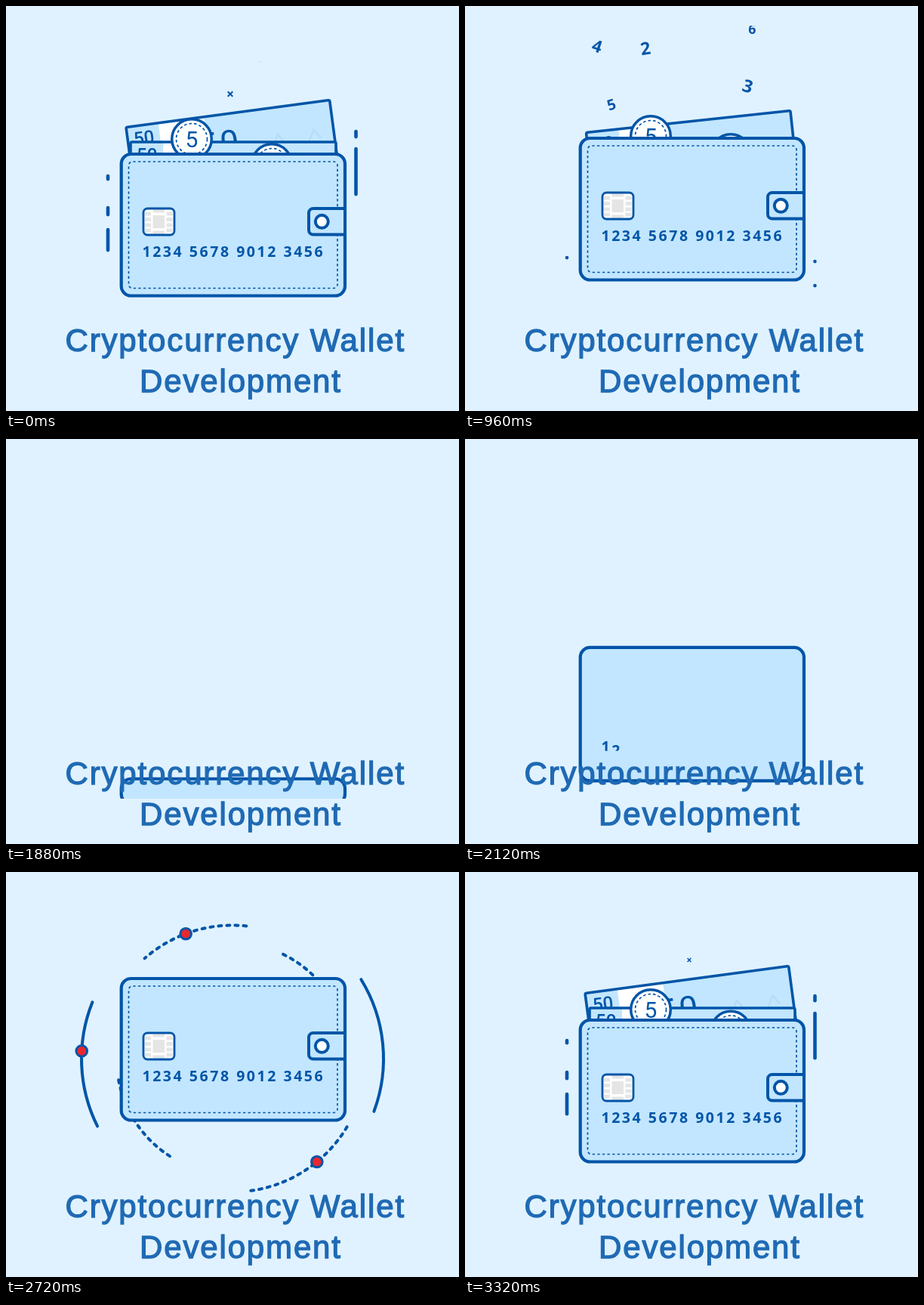
These frames come from a looping animation (600x536 px, 3.36 s). An HTML page with a canvas:

```html
<!DOCTYPE html>
<html lang="en">
<head>
<meta charset="utf-8">
<title>Wallet</title>
<style>
  html, body { margin: 0; width: 600px; height: 536px; overflow: hidden; background: #e0f2ff; }
  canvas, svg { position: absolute; left: 0; top: 0; }
  text { font: 42px "Liberation Sans", Arial, sans-serif; letter-spacing: 1.85px; fill: #1f6ab4; stroke: #1f6ab4; stroke-width: 1.3; }
</style>
</head>
<body>
<canvas id="stage" width="600" height="536"></canvas>
<svg width="600" height="536">
  <text x="78.5" y="457">Cryptocurrency Wallet</text>
  <text x="177" y="511">Development</text>
</svg>
<script>
const c = document.getElementById('stage').getContext('2d');
const LOOP = 3360, INK = '#0055a8', SKY = '#c2e6ff', RAD = Math.PI / 180;
const NUMBER = '1234 5678 9012 3456';

const clamp = u => Math.max(0, Math.min(1, u));
const mix = (a, b, u) => a + (b - a) * u;
const span = (t, a, b) => clamp((t - a) / (b - a));
const smooth = u => u * u * (3 - 2 * u);
const ease = (t, a, b) => smooth(span(t, a, b));
const easeOut = (t, a, b) => Math.sin(Math.PI / 2 * span(t, a, b));

// Eased value through [time, value] keys
function along(t, keys) {
  let v = keys[0][1];
  for (let i = 1; i < keys.length; i++) {
    const [a, from] = keys[i - 1], [b, to] = keys[i];
    if (t >= a) v = mix(from, to, ease(t, a, b));
  }
  return v;
}

function pen(width, dash = [], color = INK, cap = 'butt') {
  c.lineWidth = width;
  c.strokeStyle = color;
  c.lineCap = cap;
  c.setLineDash(dash);
}

function box(x, y, w, h, r, fill, width) {
  c.beginPath();
  c.roundRect(x, y, w, h, r);
  c.fillStyle = fill;
  c.fill();
  if (width) { pen(width); c.stroke(); }
}

function disc(x, y, r, fill, width, dash) {
  if (r <= 0) return;
  c.beginPath();
  c.arc(x, y, r, 0, 7);
  if (fill) { c.fillStyle = fill; c.fill(); }
  pen(width, dash);
  c.stroke();
}

function line(...pts) {
  c.beginPath();
  pts.forEach(([x, y]) => c.lineTo(x, y));
  c.stroke();
}

function label(text, x, y, font, spacing = 0) {
  c.font = font;
  c.letterSpacing = spacing + 'px';
  c.fillStyle = INK;
  c.fillText(text, x, y);
}

// radius, start, tail and head while open, tail and head at the end, dot while open and at the end, dot exit
const orbits = [
  { r: 200, from: -85, open: [-51.7, -7], end: [18.5, 28] },
  { r: 200, from: 100, open: [132, 181.7], end: [207, 207.5], dot: [154.6, 207.5], out: -340 },
  { r: 176.5, from: -40, open: [-63, -96], end: [-136.5, -141], dot: [-75.2, -141.2], out: -340, dash: 1 },
  { r: 176.5, from: 125, open: [107, 62], end: [20, 20], dot: [86, 20], out: -440, dash: 1 },
  { r: 153.5, from: -105, open: [-84.4, -65], end: [-13.5, -3.7], dash: 1 },
  { r: 153.5, from: 80, open: [101, 139.8], end: [177, 178], dash: 1 }
];

function drawOrbits(t) {
  if (t < -1200 || t > -280) return;
  const a = span(t, -1200, -960), b = span(t, -960, -360);
  for (const o of orbits) {
    const turn = (open, end, u) => mix(mix(o.from, open, a), end, u);
    const head = turn(o.open[1], o.end[1], b * (2 - b));
    const tail = mix(turn(o.open[0], o.end[0], b * b), head, span(t, -350, -300));
    if (Math.abs(head - tail) > .2) {
      c.beginPath();
      c.arc(300, 247, o.r, tail * RAD, head * RAD, head < tail);
      pen(4, o.dash ? [4, 7] : [], INK, 'round');
      c.stroke();
    }
    if (o.dot) {
      const d = turn(...o.dot, b) * RAD;
      const size = span(t, -1200, -1080) * (1 - span(t, o.out, o.out + 60));
      disc(300 + o.r * Math.cos(d), 247 + o.r * Math.sin(d), 7.3 * size, '#e9282f', 3 * size);
    }
  }
  if (t > -990 && t < -910) {
    pen(4);
    line([193, 357], [193, 374]);
  }
}

// x, then top and bottom at the start, the middle and the end, then the time it is gone
const streaks = [
  [135, 223, 231, 316, 319, 324, 324, 760],
  [135, 265, 278, 332, 336, 333, 333, 1040],
  [135, 294, 325, 361, 367, 368, 368, 760],
  [463.5, 164, 175, 298, 302, 338, 338, 1040],
  [463.5, 187, 251, 331, 346, 370, 370, 1080]
];

function drawStreaks(t) {
  for (const [x, a0, b0, a1, b1, a2, b2, stop] of streaks) {
    if (t < -230 || t > stop) continue;
    const u = ease(t, 0, 600), v = span(t, 600, Math.min(stop, 960));
    const top = mix(mix(a0, a1, u), a2, v) - 2 * span(-t, 0, 40);
    const end = mix(mix(b0, b1, u), b2, v) - 3 * span(-t, 0, 40);
    const pad = Math.min(2, (end - top) / 2);
    pen(4.6, [], INK, 'round');
    line([x, top + pad], [x, mix(top + pad, end - pad, span(t, -230, -40)) + .1]);
  }
}

// glyph, x, y, height, tilt, start
const sparks = [
  ['×', 297, 116.5, 16, 0, -150], ['7', 337, 74, 16, 8, -20],
  ['5', 194, 130.5, 16, -18, 155], ['6', 380.5, 30.5, 16, 3, 140],
  ['4', 175, 53, 16, 18, 260], ['3', 374.5, 106, 16.5, 17, 470],
  ['2', 239, 56, 16.5, -9, 580]
];

function drawSparks(t) {
  for (const [glyph, x, y, h, tilt, start] of sparks) {
    const s = Math.min(span(t, start, start + 300), 1 - span(t, start + 780, start + 980), 1 - span(t, 1240, 1400));
    if (s <= 0) continue;
    c.save();
    c.translate(x, y);
    c.rotate(tilt * RAD);
    c.scale(s, s);
    if (glyph === '×') {
      pen(4);
      line([-6.5, -6.5], [6.5, 6.5]);
      line([6.5, -6.5], [-6.5, 6.5]);
    } else {
      c.textAlign = 'center';
      label(glyph, 0, h / 2, `bold ${h / .714}px "Open Sans", sans-serif`);
    }
    c.restore();
  }
}

function drawBill(x, y, angle) {
  c.save();
  c.translate(x, y);
  c.rotate(angle * RAD);
  box(0, 0, 272, 110, 2, SKY);
  c.fillStyle = '#fff';
  c.fillRect(43, 0, 61, 110);
  label('50', 8, 25, '500 24px Roboto, sans-serif');
  label('50', 92, 53, '44px Roboto, sans-serif', 4);
  pen(2, [], '#b4dbf4');
  for (const peak of [198, 246]) line([peak - 9, 52], [peak, 36], [peak + 8, 48]);
  pen(3.6);
  c.beginPath();
  c.roundRect(0, 0, 272, 110, 2);
  c.stroke();
  c.restore();
}

function drawCoin(x, y) {
  disc(x, y, 26.3, '#fff', 3.5);
  disc(x, y, 20.5, null, 1.7, [3.6, 3]);
  c.textAlign = 'center';
  label('5', x, y + 11, '30px Roboto, sans-serif');
  c.textAlign = 'left';
}

function drawMoney(t) {
  if (t < -360 || t > 1130) return;
  const key = (a, b, d, e) => along(t, [[-340, a], [-80, b], [600, b], [960, d], [1120, e]]);
  drawBill(key(160, 159, 160.5, 164), key(205, 160.5, 167.5, 200), key(0, -7.6, -6.1, 0));
  drawBill(165, key(215, 180, 186, 212), 0);
  drawCoin(352, along(t, [[-340, 235], [-120, 215], [0, 209], [560, 188], [640, 188], [960, 196], [1120, 226]]));
  drawCoin(246, along(t, [[-340, 232], [-100, 190], [-40, 182], [0, 176], [380, 136], [600, 135], [960, 172], [1120, 215]]));
}

function drawChip(t, y) {
  const u = ease(t, -1150, -720), grow = span(t, -1200, -1100);
  if (!grow) return;
  c.save();
  c.translate(mix(301, 202.5, u), y + 89.5);
  c.scale(mix(29, 41, u) / 41 * grow, grow);
  box(-20.5, -17.5, 41, 35, 5.5, '#fff');
  c.fillStyle = '#e5e5e5';
  c.fillRect(-8, -8.5, 15.5, 17);
  for (const side of [-18.5, 10]) for (const row of [-13, -5.5, 2, 9]) c.fillRect(side, row, 8, 5);
  for (const edge of [-16, 12]) c.fillRect(-8, edge, 15.5, 4);
  pen(2.8);
  c.beginPath();
  c.roundRect(-20.5, -17.5, 41, 35, 5.5);
  c.stroke();
  c.restore();
}

function drawStitches(t, y) {
  const n = Math.floor(445 * ease(t, -1200, -720) / 6.6);
  if (!n) return;
  const top = y + 10, low = y + 177.5;
  pen(1.7, [...Array(2 * n - 1).fill(3.3), 999]);
  c.lineDashOffset = 1.65;
  for (const side of [162.5, 439]) {
    c.beginPath();
    c.moveTo(276, low);
    c.arcTo(side, low, side, top, 5);
    c.arcTo(side, top, 325, top, 5);
    c.lineTo(325, top);
    c.stroke();
  }
  c.lineDashOffset = 0;
}

function drawNumber(t, y) {
  const base = y + 136;
  c.save();
  c.beginPath();
  c.rect(160, base - 20, 280, 21);
  c.clip();
  for (let i = 0; i < NUMBER.length; i++) {
    const start = -1280 + i * 21, u = span(t, start, start + 60);
    if (!u) continue;
    c.font = 'bold 19.5px "Open Sans", sans-serif';
    c.letterSpacing = '2.55px';
    const x = 180.5 + c.measureText(NUMBER.slice(0, i)).width;
    label(NUMBER[i], x, base + 17 * (1 - u) ** 2, c.font, 2.55);
  }
  c.restore();
}

function drawClasp(t, y) {
  const w = 48 * ease(t, -1200, -920), r = 8.5 * ease(t, -1040, -880);
  if (w < 2) return;
  box(449 - w, y + 72, w, 34.5, [6, 0, 0, 6], SKY, 4);
  disc(418.3, y + 89.3, r, '#fff', Math.min(4, 2 + r / 4));
}

function walletTop(t) {
  if (t < -840) return 482 - 341 * easeOut(t, -1520, -840);
  if (t < 1100) return along(t, [[-360, 141], [-60, 196], [490, 196], [1100, 171.8]]);
  return mix(171.8, 483, span(t, 1100, 1440) ** 2);
}

function drawWallet(t) {
  const y = walletTop(t);
  if (y > 479) return;
  box(152.7, y, 296.3, 187.5 * easeOut(t, -1520, -1160), 13, SKY, 4.2);
  drawStitches(t, y);
  drawChip(t, y);
  drawNumber(t, y);
  drawClasp(t, y);
}

function frame(now) {
  // Negative times lead up to the loop point
  let t = now % LOOP;
  if (t > 1640) t -= LOOP;
  c.clearRect(0, 0, 600, 536);
  c.save();
  c.beginPath();
  c.rect(0, 26, 600, 450);
  c.clip();
  drawOrbits(t);
  drawStreaks(t);
  drawSparks(t);
  drawMoney(t);
  drawWallet(t);
  c.restore();
}

const begin = performance.now();
function tick() {
  frame(performance.now() - begin);
  requestAnimationFrame(tick);
}
tick();
</script>
</body>
</html>
```
